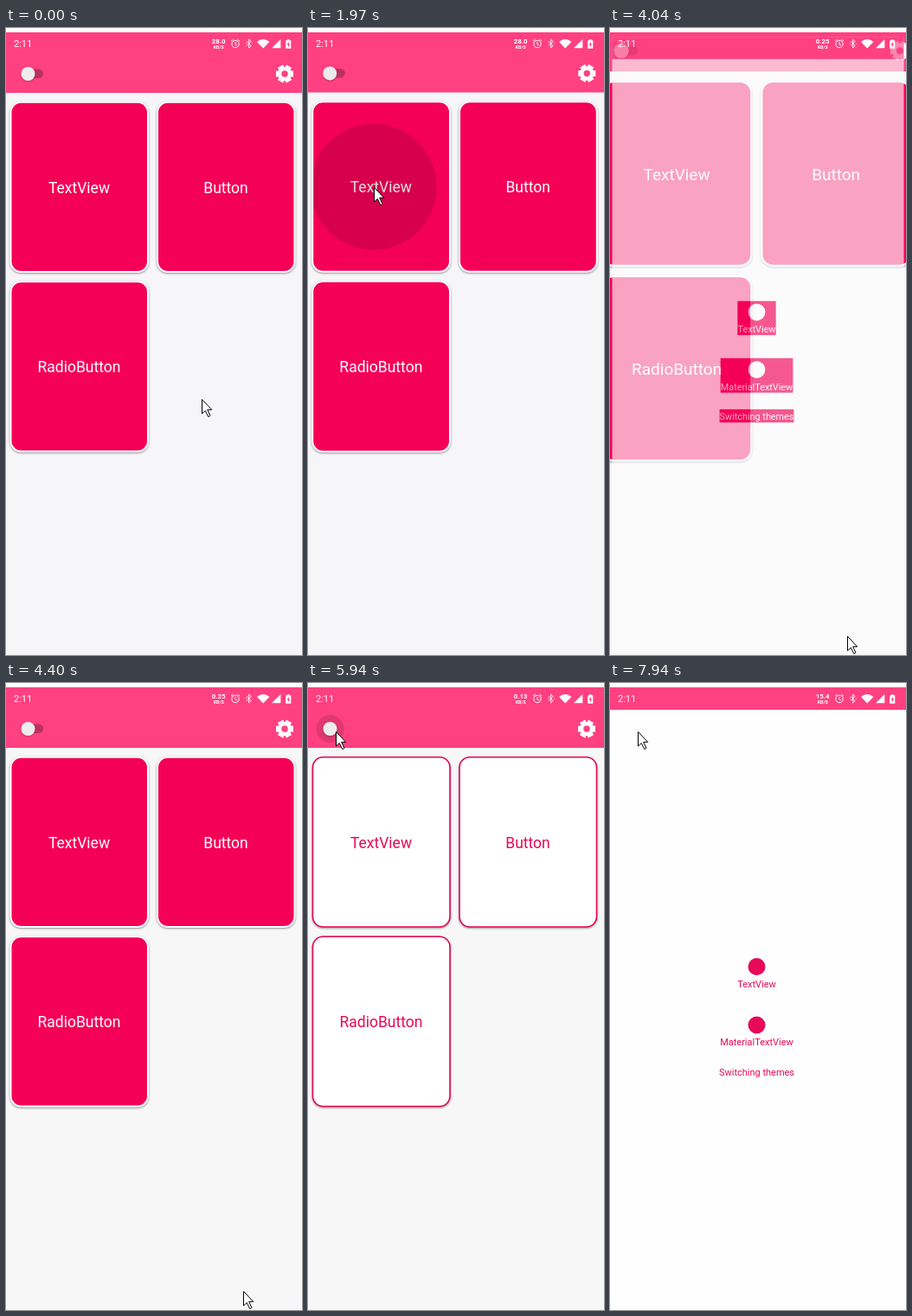
Recreate the animation shown at these times as an HTML page. Size 342 by 725 pixels, loop 7990 ms.

```html
<!DOCTYPE html>
<html lang="en">
<head>
<meta charset="utf-8">
<title>Switching themes</title>
<style>
  html, body { margin: 0; width: 100%; height: 100%; overflow: hidden; background: #fff; }
  svg { display: block; width: 342px; height: 725px; font-family: Roboto, "Open Sans", sans-serif; }
  .win { transform-origin: 171px 365px; }
  .bar { fill: #ff4081; }
  .card { fill: #f50057; stroke: #fff; stroke-width: 2; filter: drop-shadow(0 1px 1.2px rgba(0,0,0,.42)); }
  .label { fill: #fff; font-size: 17.5px; text-anchor: middle; }
  .chip { fill: #f50057; }
  .note { fill: #fff; font-size: 11px; text-anchor: middle; }
  .outlined .card { fill: #fff; stroke: #e60557; stroke-width: 1.6; }
  .outlined .label, .outlined .note { fill: #e60a58; }
  .outlined .chip { fill: none; }
</style>
</head>
<body>
<svg viewBox="0 0 342 725">
  <defs>
    <clipPath id="screen"><rect y="5" width="342" height="720"/></clipPath>
    <clipPath id="first"><rect x="6.5" y="86.5" width="157" height="195" rx="11"/></clipPath>
  </defs>
  <g clip-path="url(#screen)">
    <g id="home" class="win">
      <rect id="back" y="5" width="342" height="720"/>
      <rect class="bar" y="5" width="342" height="70"/>
      <rect id="track" x="18" y="47.5" width="25" height="10.5" rx="5.25" fill="#bd3060"/>
      <circle id="press" cx="25.5" cy="53" opacity=".12"/>
      <circle cx="25.5" cy="53" r="8" fill="#ececec" style="filter:drop-shadow(0 1px 1px rgba(0,0,0,.25))"/>
      <g transform="translate(322 53)" stroke="#fff" fill="none">
        <path d="M-10 0H10M-5 -8.66L5 8.66M5 -8.66L-5 8.66" stroke-width="7"/>
        <circle r="5.8" stroke-width="4.4"/>
        <circle r="3.7" fill="#ff4081" stroke="none"/>
      </g>
      <g id="cards"></g>
      <circle id="touch" cx="76" cy="184" opacity=".12" clip-path="url(#first)"/>
    </g>
    <g id="detail" class="win">
      <rect y="5" width="342" height="720" fill="#fefefe"/>
      <rect class="bar" y="5" width="342" height="26"/>
      <rect class="chip" x="147" y="315" width="45" height="40"/>
      <rect class="chip" x="127" y="382" width="85" height="40.5"/>
      <rect class="chip" x="126" y="442" width="87" height="15.5"/>
      <circle class="note" cx="169.5" cy="328" r="10"/>
      <circle class="note" cx="169.5" cy="395.5" r="10"/>
      <text class="note" x="169.5" y="352">TextView</text>
      <text class="note" x="169.5" y="419.3">MaterialTextView</text>
      <text class="note" x="169.5" y="454">Switching themes</text>
    </g>
  </g>
  <g fill="#fff">
    <text x="9" y="22" font-size="11">2:11</text>
    <g font-weight="700" text-anchor="middle">
      <text id="speed" x="245.7" y="18" font-size="7.8"></text>
      <text x="245.7" y="23.5" font-size="5.3">KB/S</text>
    </g>
    <g fill="none" stroke="#fff">
      <circle cx="265" cy="18.5" r="4.2"/>
      <path d="M265 16V19L267 20M260 15.2L262.6 13M270 15.2L267.4 13"/>
      <path d="M278 15.3L283.2 20.7L280.7 23V13.2L283.2 15.5L278 20.7M277 18H277.8M284 18H284.8" stroke-width=".9"/>
    </g>
    <path d="M290 16Q297.2 10.2 304.4 16L297.2 23.5Z"/>
    <path d="M307 23.3L317.3 13V23.3Z"/>
    <path d="M325 13.2H327.5V14.2H329.3V23.8H323.2V14.2H325Z"/>
    <path d="M326.8 15.8L324.6 19.5H326V22.3L328.1 18.5H326.8Z" fill="#ff4081"/>
  </g>
  <path id="cursor" d="M.5 .5V17L4.3 13.5L7.6 20.3Q9.4 20.8 9.9 19.2L6.7 12.3H11.7Z" fill="#fff" stroke="#000"/>
</svg>
<script>
const LOOP = 7990, THEME_AT = 5600;
const $ = id => document.getElementById(id);
const clamp = v => Math.min(1, Math.max(0, v));
const ramp = (t, from, to) => clamp((t - from) / (to - from));
const mix = (a, b, k) => a + (b - a) * k;

[["TextView", 0, 0], ["Button", 1, 0], ["RadioButton", 0, 1]].forEach(([name, col, row]) => {
  const x = 5.5 + col * 169.5, y = 85.7 + row * 207.5;
  $("cards").innerHTML += `<rect class="card" x="${x}" y="${y}" width="158.5" height="196.3" rx="12"/>
    <text class="label" x="${x + 79}" y="${y + 105}">${name}</text>`;
});

// Window easing: a quick start, then a very long slow end.
const bezier = (u, a, b, c, d) =>
  a * (1 - u) ** 3 + 3 * b * u * (1 - u) ** 2 + 3 * c * u * u * (1 - u) + d * u ** 3;
function windowEase(x) {
  const [xs, ys] = x < 1 / 6
    ? [[0, .05, .1333, 1 / 6], [0, 0, .06, .4]]
    : [[1 / 6, .2083, .25, 1], [.4, .82, 1, 1]];
  let lo = 0, hi = 1;
  for (let i = 0; i < 24; i++) {
    const mid = (lo + hi) / 2;
    if (bezier(mid, ...xs) < x) lo = mid; else hi = mid;
  }
  return bezier(lo, ...ys);
}

// Pointer moves: start, end, x, y
const moves = [
  [0, 0, 226, 429], [210, 1050, 39, 50], [1050, 1150, 32, 61], [1380, 1430, 32, 64],
  [1430, 1740, 76, 184], [2440, 2680, 263, 689], [2910, 3110, 274, 703], [4500, 5150, 32, 56]
];
function pointer(t) {
  let x = 0, y = 0;
  for (const [from, to, px, py] of moves) {
    if (t < from) break;
    const k = to > from ? ramp(t, from, to) : 1, s = k * k * (3 - 2 * k);
    x = mix(x, px, s);
    y = mix(y, py, s);
  }
  return [x, y];
}

function windows(t) {
  if (t >= 3993 && t < 7570) {
    const p = windowEase(ramp(t, 3993, 4393));
    return { home: mix(1.1, 1, p), detail: mix(1, .9, p), alpha: 1 - ramp(t, 4011, 4094) };
  }
  const start = t < 3993 ? 1945 : 7570, p = windowEase(ramp(t, start, start + 400));
  return { home: mix(1, 1.05, p), detail: mix(.85, 1, p), alpha: ramp(t, start + 50, start + 133) };
}

function draw(t) {
  document.querySelector("svg").classList.toggle("outlined", t >= THEME_AT);
  $("back").setAttribute("fill", t < 2360 ? "#f6f5f8" : "#f7f7f7");
  $("speed").textContent = t < 2100 ? "28.0" : t < 5000 ? "0.25" : t < 7700 ? "0.13" : "15.4";

  const w = windows(t);
  $("home").style.transform = `scale(${w.home})`;
  $("detail").style.transform = `scale(${w.detail})`;
  $("detail").style.opacity = w.alpha;

  const grow = ramp(t, 5290, 5500), fade = 1 - ramp(t, 5960, 6090);
  $("press").setAttribute("r", 16 * grow);
  $("press").setAttribute("opacity", .12 * fade);
  $("track").setAttribute("opacity", 1 - grow * fade);
  $("touch").setAttribute("r", t < 2360 ? 180 * ramp(t, 1870, 2120) : 0);

  $("cursor").setAttribute("transform", `translate(${pointer(t)})`);
}

const begin = performance.now();
(function tick() {
  draw((performance.now() - begin) % LOOP);
  requestAnimationFrame(tick);
})();
</script>
</body>
</html>
```
